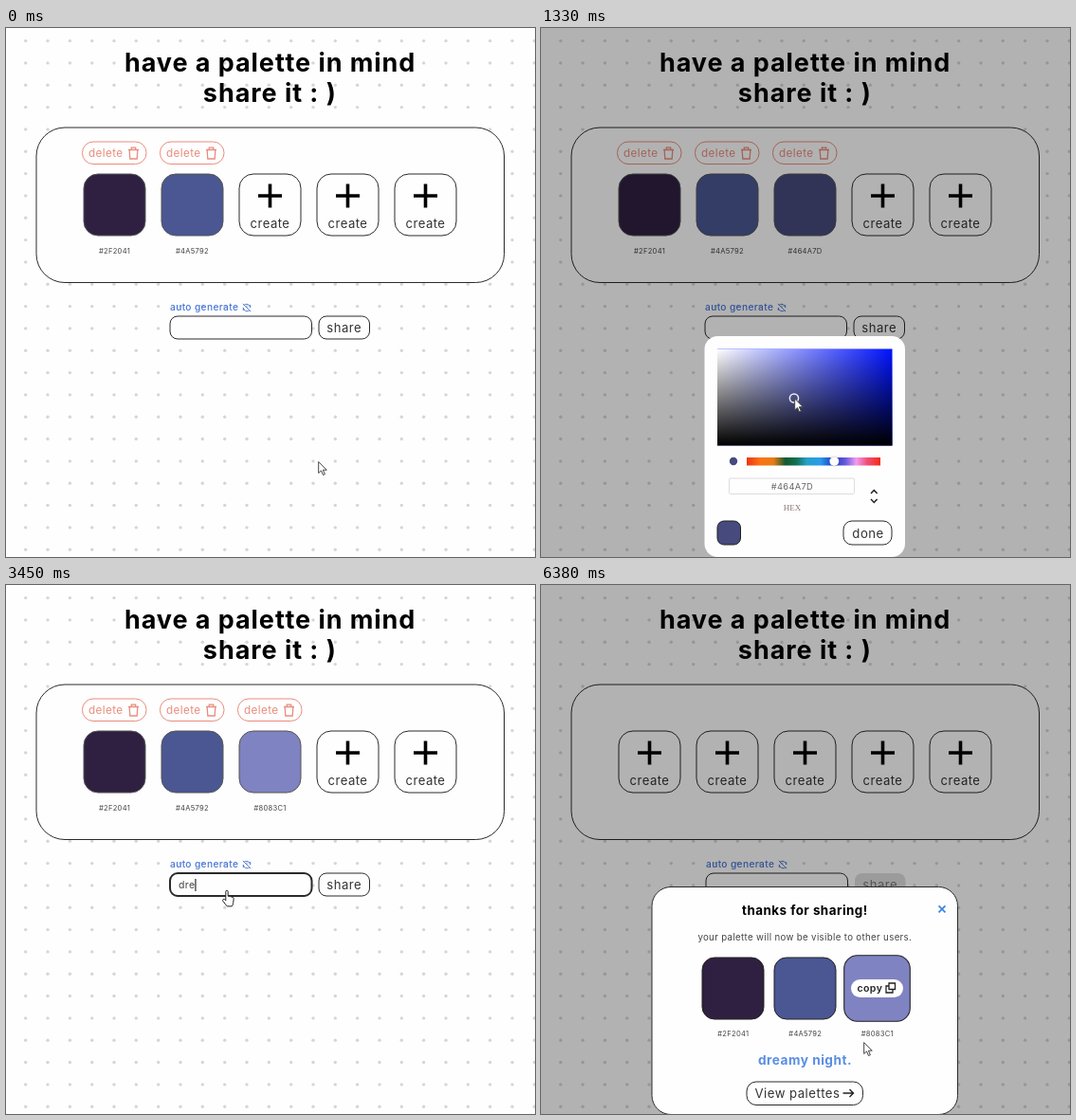
Recreate the animation shown at these times as an HTML page. Size 558 px wide and 558 px high, loop 8120 ms.

```html
<!DOCTYPE html>
<html lang="en">
<head>
<meta charset="utf-8">
<title>Palette sharing</title>
<style>
  html, body { margin: 0; width: 100%; height: 100%; overflow: hidden; background: #fefefe; }
  svg { display: block; width: 100vw; height: 100vh; }
  text { font-family: Inter, sans-serif; font-optical-sizing: none; letter-spacing: .035em; white-space: pre; }
  .line { fill: none; stroke: #222; }
  .box { fill: #fefefe; stroke: #2a2a2a; }
</style>
</head>
<body>
<svg id="stage" viewBox="0 0 558 558"></svg>
<script>
const LOOP = 8120;
const PHRASE = 'dreamy night';
const FIXED = ['#2F2041', '#4A5792'];
const FINAL = '#8083C1';
const SALMON = '#e98d7d';
const BLUE = '#4675d8';

// Markup helpers
const text = (x, y, size, str, attrs = '') =>
  `<text x="${x}" y="${y}" font-size="${size}" ${attrs}>${str}</text>`;
const mid = (x, y, size, str, attrs = '') => text(x, y, size, str, 'text-anchor="middle" ' + attrs);
const rect = (x, y, w, h, r, attrs = 'class="box"') =>
  `<rect x="${x}" y="${y}" width="${w}" height="${h}" rx="${r}" ${attrs}/>`;
const path = (d, attrs = 'class="line"') => `<path d="${d}" ${attrs}/>`;
const circle = (x, y, r, attrs) => `<circle cx="${x}" cy="${y}" r="${r}" ${attrs}/>`;
const group = (id, body) => `<g id="${id}">${body}</g>`;
const ramp = (id, dir, stops) => `<linearGradient id="${id}" x1="0" y1="0" ${dir}>` +
  stops.map(([o, c, a = 1]) => `<stop offset="${o}" stop-color="${c}" stop-opacity="${a}"/>`).join('') +
  '</linearGradient>';

const slotX = i => 114.5 + 82 * i;

function createTile(i) {
  const x = slotX(i);
  return group('add' + i,
    rect(x - 32.5, 154, 65, 65, 15) +
    path(`M${x - 12.5} 177h25M${x} 164.5v25`, 'stroke="#000" stroke-width="3.6"') +
    mid(x, 210.7, 13.1, 'create', 'fill="#333"'));
}

function colourTile(i) {
  const x = slotX(i), bin = x + 20;
  return group('col' + i,
    rect(x - 34, 120, 67.5, 23.5, 11.5, `fill="#fefefe" stroke="${SALMON}"`) +
    text(x - 27.5, 136.2, 11.7, 'delete', `fill="${SALMON}"`) +
    path(`M${bin - 5.5} 128.5h11M${bin - 2.2} 128v-1.8h4.4v1.8M${bin - 4.3} 129l.6 9h7.4l.6-9`,
      `fill="none" stroke="${SALMON}" stroke-width="1.3"`) +
    rect(x - 32.5, 154, 65, 65, 15, `id="fill${i}" fill="${FIXED[i] || FINAL}" stroke="#555"`) +
    mid(x, 238, 7.6, FIXED[i] || FINAL, `id="hex${i}" fill="#444"`));
}

const dots = Array.from({ length: 24 * 24 }, (_, n) =>
  circle((20.7 + 23.33 * (n % 24)).toFixed(1), (13.6 + 23.33 * Math.floor(n / 24)).toFixed(1), 1.7, '')).join('');

const defs = '<defs>' +
  ramp('sat', 'x2="1" y2="0"', [[0, '#fff'], [1, '#fff', 0]]) +
  ramp('val', 'x2="0" y2="1"', [[0, '#000', 0], [1, '#000']]) +
  ramp('hues', 'x2="1" y2="0"', [[0, '#ee3414'], [.1, '#f97316'], [.2, '#e87c14'], [.29, '#0f5a30'],
    [.37, '#147050'], [.45, '#26a0c8'], [.55, '#2a9cec'], [.65, '#1a38c4'], [.74, '#6a5cdc'],
    [.82, '#f09cf0'], [.9, '#f05078'], [1, '#f42c18']]) +
  '<clipPath id="square"><rect x="186" y="338.5" width="184.5" height="102"/></clipPath></defs>';

const field = group('field',
  text(173, 298.3, 10.2, 'auto generate', `font-weight="500" fill="${BLUE}"`) +
  path('M250.8 292.5a4 4 0 0 1 6.9 2.5v-3M257.2 297.5a4 4 0 0 1-6.9-2.5v3M249.8 290.8l8.4 8.4',
    `fill="none" stroke="${BLUE}" stroke-width=".9"`) +
  rect(173, 304, 149.5, 24, 8, 'id="entry" class="box"') +
  text(182, 320, 10.5, '', 'id="typed" fill="#444"') +
  path('M0 310v13', 'id="caret" stroke="#000"') +
  rect(330, 304, 53.5, 24, 8, 'id="share" class="box"') +
  mid(356.7, 321, 13.1, 'share', 'id="shareText"'));

const page = group('page',
  mid(278.6, 46, 27, 'have a palette in mind', 'font-weight="700"') +
  mid(278.3, 78, 27, 'share it : )', 'font-weight="700" letter-spacing="0"') +
  rect(32, 105, 493.5, 163.5, 30) +
  [0, 1, 2, 3, 4].map(createTile).join('') + [0, 1, 2].map(colourTile).join('') + field);

const area = fill => rect(186, 338.5, 184.5, 102, 0, fill);
const picker = group('picker',
  rect(172.5, 325, 211.5, 233, 14, 'fill="#fefefe"') +
  area('id="hueFill"') + area('fill="url(#sat)"') + area('fill="url(#val)"') +
  '<g clip-path="url(#square)">' +
  circle(0, 0, 4.6, 'id="ring" fill="none" stroke="#eee" stroke-width="1.5"') + '</g>' +
  circle(203, 457, 4.2, 'id="spot"') +
  rect(217, 453, 141, 8.5, 0, 'fill="url(#hues)"') +
  circle(0, 457, 5, 'id="thumb" fill="#fff" stroke="#0002"') +
  rect(198.5, 475, 132, 16.5, 1, 'fill="#fefefe" stroke="#ddd"') +
  mid(265, 487, 9.3, '', 'id="code" fill="#666"') +
  mid(265, 509, 9, 'HEX', 'fill="#8c7676" style="font-family:Liberation Serif,serif;letter-spacing:0"') +
  path('M348 491l3.3-3.5 3.3 3.5M348 497l3.3 3.5 3.3-3.5', 'fill="none" stroke="#222" stroke-width="1.5"') +
  rect(186, 520, 24.5, 25, 7, 'id="chip" stroke="#222"') +
  rect(319, 520, 51, 25, 9, 'id="done" class="box"') +
  mid(345, 537.5, 13.2, 'done', 'id="doneText"'));

const sharedTile = (c, i) => {
  const x = 202.5 + 76 * i;
  return group('tile' + i, rect(x - 32.5, 393, 65, 65, 13, `fill="${c}" stroke="#222"`)) +
    mid(x + .3, 476, 7.6, c, 'fill="#444"');
};
const thanks = group('thanks',
  rect(117, 318.5, 322.5, 240, 20) +
  mid(278.4, 347.7, 13.4, 'thanks for sharing!', 'font-weight="700"') +
  path('M419.5 338.3l7 7M426.5 338.3l-7 7', 'stroke="#3f86e8" stroke-width="1.8"') +
  mid(278.3, 375.3, 9.7, 'your palette will now be visible to other users.', 'fill="#444"') +
  [...FIXED, FINAL].map(sharedTile).join('') +
  group('copy', rect(327, 416, 55, 19, 9.5, 'fill="#fff"') +
    text(333.5, 429.3, 10.6, 'copy', 'font-weight="600" fill="#222"') +
    path('M367 420h6.5v6.5h-6.5zM367 423h-3v7h7v-3.3', 'fill="none" stroke="#222" stroke-width="1.3"')) +
  mid(278.5, 506, 13.7, 'dreamy night.', 'font-weight="700" fill="#5a8ee4"') +
  rect(217, 524, 122.5, 24.5, 10) +
  text(225.5, 541, 13.2, 'View palettes', 'fill="#333"') +
  path('M318.5 536h11M325.5 532l4 4-4 4', 'fill="none" stroke="#222" stroke-width="1.4"'));

const loader = group('loader', ['#e8736c', '#5590d8', '#ecc5a3'].map((c, i) =>
  circle(262 + 16.4 * i, 442, 4.4, `id="ball${i}" fill="${c}"`)).join(''));

const pointers =
  path('M.7 .5V12.5L3.5 9.9 5.5 14.5 7.4 13.7 5.4 9.2H9.3Z', 'id="arrow" fill="#fff" stroke="#444"') +
  path('M-1.2 10V1.4a1.2 1.2 0 0 1 2.4 0V6.2q2 0 5 1.2 1.1.5 1 1.8l-.6 4.5q-.3 2-1.4 3.2H.2' +
    'Q-1 15.5-4 11.6-5 10-3.8 9.4T-1.2 10.9Z', 'id="hand" fill="#fff" stroke="#222"');

const stage = document.getElementById('stage');
stage.innerHTML = defs + `<rect width="558" height="558" fill="#fefefe"/><g fill="#d6d6d6">${dots}</g>` +
  page + loader + '<rect id="shade" width="558" height="558"/>' + picker + thanks + pointers;

const el = {};
stage.querySelectorAll('[id]').forEach(n => el[n.id] = n);
const set = (id, attrs) => { for (const k in attrs) el[id].setAttribute(k, attrs[k]); };
const show = (id, on) => el[id].setAttribute('visibility', on ? 'inherit' : 'hidden');

// Timing helpers
const clamp = x => Math.max(0, Math.min(1, x));
const ease = x => x * x * (3 - 2 * x);
const ramped = (t, a, b) => ease(clamp((t - a) / (b - a)));
const within = (t, a, b) => t >= a && t < b;
function track(t, keys) {
  let i = 0;
  while (i < keys.length - 2 && t >= keys[i + 1][0]) i++;
  const [a, b] = [keys[i], keys[i + 1]], k = ramped(t, a[0], b[0]);
  return a.slice(1).map((v, n) => v + (b[n + 1] - v) * k);
}
function hsvHex(h, s, v) {
  const part = n => {
    const k = (n + h / 60) % 6;
    return Math.round(255 * v * (1 - s * clamp(Math.min(k, 4 - k))));
  };
  return '#' + [5, 3, 1].map(n => part(n).toString(16).padStart(2, '0')).join('').toUpperCase();
}
const zoom = (x, y, k) => `translate(${x} ${y}) scale(${k}) translate(${-x} ${-y})`;

const HUE = [[560, 0], [830, 235.636], [1400, 235.636], [2000, 237.231]];
const TONE = [[1000, .55, .3], [1250, .44, 125 / 255], [1400, .44, 125 / 255], [2000, 65 / 193, 193 / 255]];
const MOVES = [[70, 329, 457], [190, 271, 213], [300, 271, 213], [540, 218, 457], [560, 218, 457],
  [830, 309, 457], [1000, 287, 410], [2060, 248, 363], [2330, 343, 532], [2440, 343, 532],
  [2510, 290, 328], [2860, 233, 322], [4520, 233, 322], [4950, 355, 316], [6230, 355, 316], [6380, 340, 482]];
const KEYS = [[3320, 1], [3450, 3], [3600, 4], [3650, 5], [3800, 6], [3890, 7], [3980, 8],
  [4070, 9], [4170, 10], [4260, 12]];

function drawPage(t, picked, hex) {
  const reset = t >= 5350;
  show('page', !within(t, 5350, 5690));
  for (let i = 0; i < 3; i++) {
    const filled = !reset && (i < 2 || picked);
    show('col' + i, filled);
    show('add' + i, !filled);
  }
  set('fill2', { fill: hex });
  el.hex2.textContent = hex;
  const hover = ramped(t, 120, 220) - ramped(t, 310, 420);
  set('add2', { transform: zoom(278.5, 186.5, 1 + .15 * hover) });

  const count = reset ? 0 : KEYS.reduce((n, [at, c]) => t >= at ? c : n, 0);
  const focus = within(t, 2650, 5200);
  el.typed.textContent = PHRASE.slice(0, count);
  set('entry', { 'stroke-width': focus ? 2 : 1 });
  set('caret', { transform: `translate(${182.5 + el.typed.getComputedTextLength()} 0)` });
  show('caret', focus && !within(t, 3130, 3320));
  set('field', { transform: `translate(${reset ? 1 : 0} 0)` });
  button('share', t >= 4800);
}

function button(id, grey) {
  el[id].style.fill = grey ? '#dedede' : '#fefefe';
  el[id].style.stroke = grey ? 'none' : '#2a2a2a';
  set(id + 'Text', { fill: grey ? '#777' : '#333' });
}

function drawPicker(t, h, s, v, hex, picked) {
  const open = ramped(t, 140, 270) - ramped(t, 2440, 2508);
  show('picker', open > 0);
  set('picker', { transform: `translate(0 ${240 * (1 - open)})` });
  set('hueFill', { fill: hsvHex(h, 1, 1) });
  set('ring', { cx: 186 + 184 * s, cy: 338.5 + 102 * (1 - v) });
  set('thumb', { cx: 217 + 141 * h / 360 });
  set('spot', { fill: hex });
  set('chip', { fill: picked ? hex : '#fefefe' });
  el.code.textContent = hex;
  button('done', t >= 2280);
  return open;
}

function drawThanks(t) {
  const open = ramped(t, 5680, 5760), hover = ramped(t, 6240, 6375);
  show('thanks', t >= 5690);
  set('thanks', { transform: `translate(0 ${240 * (1 - open)})` });
  set('tile2', { transform: zoom(354.5, 425.5, 1 + .07 * hover) });
  set('copy', { opacity: hover });
  return t >= 5690 ? open : 0;
}

function drawCursor(t, s, v) {
  const [x, y] = within(t, 1000, 2060) ? [186 + 184 * s, 338.5 + 102 * (1 - v)] : track(t, MOVES);
  const hand = within(t, 2280, 2460) || within(t, 2510, 5350);
  show('hand', hand);
  show('arrow', !hand);
  const at = { transform: `translate(${x} ${y})` };
  set('hand', at);
  set('arrow', { ...at, stroke: within(t, 5350, 5690) ? '#5a78b4' : '#444' });
}

function draw(t) {
  const picked = t >= 1000;
  const [h] = track(t, HUE);
  const [s, v] = picked ? track(t, TONE) : [0, 0];
  const hex = hsvHex(h, s, v);
  drawPage(t, picked, hex);
  const shade = Math.max(drawPicker(t, h, s, v, hex, picked), drawThanks(t));
  set('shade', { opacity: .3 * shade });
  show('loader', within(t, 5350, 5690));
  for (let i = 0; i < 3; i++) {
    const phase = (t - 5620) / 500 * 2 * Math.PI + 1.05 - .9 * i;
    set('ball' + i, { cy: 442 - 8 * Math.max(0, Math.sin(phase)) });
  }
  drawCursor(t, s, v);
}

function tick() {
  draw(performance.now() % LOOP);
  requestAnimationFrame(tick);
}
tick();
</script>
</body>
</html>
```
